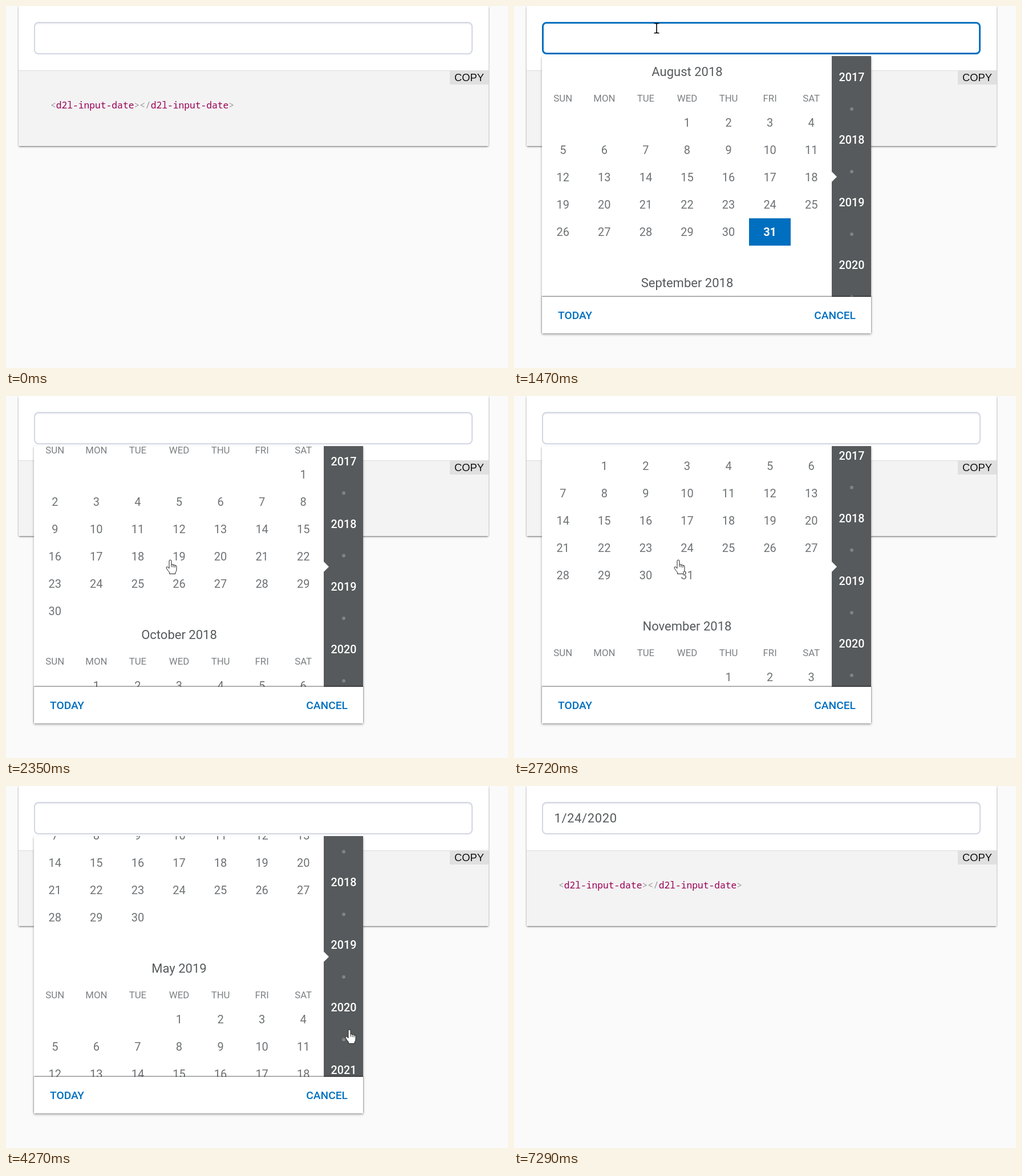
An HTML page for the animation above (8 s loop, 880 by 636 pixels).

```html
<!DOCTYPE html>
<html lang="en">
<head>
<meta charset="utf-8">
<title>Date input</title>
<style>
  html, body { margin: 0; width: 100%; height: 100%; overflow: hidden; background: #fafafa; }
  body { position: relative; font-family: Roboto, sans-serif; color: #565a5c; }
  div, svg { position: absolute; box-sizing: border-box; white-space: nowrap; }
  .card { left: 22px; top: 0; width: 824px; height: 246px; background: #fff;
    box-shadow: 0 2px 3px -1px rgba(0,0,0,.55), 0 0 3px rgba(0,0,0,.2); }
  .code { top: 113px; width: 824px; height: 133px; background: #f3f3f3; border-top: 1px solid #ddd;
    font: 16.28px/24px "Noto Sans Mono", monospace; color: #999; }
  .code b { font-weight: 400; color: #905; }
  .markup { left: 56px; top: 48px; }
  .copy { right: 0; top: 0; width: 68px; height: 24px; background: #e0e0e0; color: #111;
    font: 18.3px/24px "Liberation Sans", Arial, sans-serif; text-align: center; }
  .input { left: 49px; top: 28px; width: 769px; height: 57px; border-radius: 8px; background: #fff;
    border: 2px solid #d2d6e2; box-shadow: inset 0 2px 0 rgba(181,189,194,.2); }
  .input.active { border: 3px solid #006fbf; box-shadow: none; }
  .value { left: 70.5px; top: 42px; font-size: 22px; line-height: 30px; letter-spacing: .6px; }
  .caret { left: 71px; top: 43px; width: 2px; height: 27px; background: #555; }
  .popup { left: 49px; top: 88px; width: 577px; height: 487px; background: #fff;
    box-shadow: 0 2px 4px rgba(0,0,0,.36); }
  .months, .years { top: 0; height: 423px; overflow: hidden; }
  .months { left: 0; width: 508px; }
  .years { left: 508px; width: 69px; background: #565a5c; color: #fff; }
  .track { left: .5px; top: .5px; width: 100%; }
  .title { width: 508px; font-size: 22px; line-height: 48px; text-align: center; }
  .cell { width: 72.57px; height: 48px; line-height: 48px; font-size: 20px; text-align: center; color: #6e7275; }
  .weekday { font-size: 16.8px; color: #7c8083; }
  .today { background: #006fbf; color: #fff; font-weight: 700; }
  .year { width: 69px; font-size: 19.7px; font-weight: 500; line-height: 30px; text-align: center; }
  .dot { left: 31.5px; width: 6px; height: 6px; border-radius: 50%; background: #7f8385; }
  .marker { left: 508px; top: 203px; width: 9px; height: 18px; background: #fff;
    clip-path: polygon(0 0, 100% 50%, 0 100%); }
  .footer { left: 0; top: 423px; width: 577px; height: 64px; background: #fff;
    box-shadow: 0 -1px 2px rgba(0,0,0,.6); font-size: 19.2px; font-weight: 500; line-height: 65px; color: #006fbf; }
  .cursor { left: 0; top: 0; overflow: visible; fill: #fff; stroke: #222; stroke-width: 1; stroke-linejoin: round; }
  .cursor g { visibility: hidden; }
</style>
</head>
<body>
<div class="card">
  <div class="code">
    <div class="markup">&lt;<b>d2l-input-date</b>&gt;&lt;/<b>d2l-input-date</b>&gt;</div>
    <div class="copy">COPY</div>
  </div>
</div>
<div class="input" id="input"></div>
<div class="value" id="value">1/24/2020</div>
<div class="caret" id="caret"></div>
<div class="popup" id="popup">
  <div class="months"><div class="track" id="months"></div></div>
  <div class="years"><div class="track" id="years"></div></div>
  <div class="marker"></div>
  <div class="footer">
    <div style="left:28px">TODAY</div>
    <div style="right:27px">CANCEL</div>
  </div>
</div>
<svg class="cursor" width="1" height="1">
  <g id="arrow"><path d="M.5.5V19L4.5 15.2L7.3 21.2L9.8 20.1L7.1 14.2H13.2Z"/></g>
  <g id="hand">
    <path d="M-2 10V1Q-2-1 0-1T2 1V7Q4 6 5 7.7Q7 7 8 8.5Q11 8 11 11V16Q11 19 9 21V23.5H-1.5V21Q-5 17-6.6 13.8Q-7.6 11.3-5.8 11Q-4 10.8-2 14Z"/>
    <path fill="none" d="M2 7V11.5M5 7.7V12M8 8.5V12.5"/>
  </g>
  <g id="beam"><path fill="none" stroke="#000" stroke-width="1.6" d="M-4.5-8.5H-1.5L0-7.5L1.5-8.5H4.5M0-7.5V7.5M-4.5 8.5H-1.5L0 7.5L1.5 8.5H4.5"/></g>
</svg>
<script>
const LOOP = 8000, MONTH = 371, ROW = 48, COL = 508 / 7, YEAR = 110;
const $ = id => document.getElementById(id);

function add(parent, cls, top, left = 0, text = '') {
  const el = document.createElement('div');
  el.className = cls;
  el.style.top = top + 'px';
  if (left) el.style.left = left + 'px';
  el.textContent = text;
  parent.append(el);
}

const names = 'January February March April May June July August September October November December'.split(' ');
const weekdays = 'SUN MON TUE WED THU FRI SAT'.split(' ');

// August 2018 is month 0 of the scroller
for (let i = 0; i < 20; i++) {
  const first = new Date(2018, 7 + i, 1), y = first.getFullYear(), m = first.getMonth();
  const top = i * MONTH, start = first.getDay(), count = new Date(y, m + 1, 0).getDate();
  add($('months'), 'title', top + 3.5, 0, `${names[m]} ${y}`);
  weekdays.forEach((d, c) => add($('months'), 'cell weekday', top + 49, c * COL, d));
  for (let d = 1; d <= count; d++) {
    const n = start + d - 1;
    add($('months'), i === 0 && d === 31 ? 'cell today' : 'cell',
      top + 92 + Math.floor(n / 7) * ROW, n % 7 * COL, d);
  }
}
for (let y = 2016; y < 2025; y++) {
  const mid = 37.5 + (y - 2017) * YEAR;
  add($('years'), 'year', mid - 15, 0, y);
  add($('years'), 'dot', mid + 52, 0);
}

// The screen refreshes in even steps within each busy spell: start, end, count
const spells = [[120, 830, 10], [1150, 1940, 11], [2040, 2720, 10], [2950, 3720, 11],
  [4100, 4410, 5], [4880, 5100, 4], [5330, 5410, 2], [7120, 7290, 3]];
function refresh(t) {
  for (const [a, b, n] of spells) {
    const step = (b - a) / (n - 1);
    if (t >= a && t < b) return a + Math.floor((t - a) / step) * step;
  }
  return t;
}

// Keys: time, x, y, shape
const pointer = [
  [0, 300, 430, ''], [120, 300, 430, 'arrow'], [420, 268, 120, 'arrow'], [500, 260, 80, 'beam'],
  [830, 250, 39, 'beam'], [1520, 250, 39, 'beam'], [1650, 258, 87, 'hand'], [1940, 288, 289, 'hand'],
  [3020, 288, 289, 'hand'], [3400, 520, 390, 'hand'], [3480, 570, 410, 'arrow'], [3600, 634, 428, 'arrow'],
  [3720, 602, 429, 'arrow'], [3960, 602, 429, 'hand'], [4820, 602, 429, 'arrow'], [5100, 451, 402, 'arrow'],
  [5329, 451, 402, 'arrow'], [5330, 457, 404, 'hand'], [5410, 451, 402, 'hand'], [5970, 451, 402, 'arrow'],
  [7040, 451, 402, 'arrow'], [7205, 4, 223, 'arrow'], [7290, 4, 223, ''], [LOOP, 4, 223, '']
];
const wheel = [[0, 0], [1960, 0], [2040, 95], [2640, 775], [2720, 824], [2900, 824], [3120, 962], [LOOP, 962]];

function at(keys, t) {
  const i = Math.max(1, keys.findIndex(k => k[0] > t));
  const a = keys[i - 1], b = keys[i], p = (t - a[0]) / (b[0] - a[0]);
  return a.map((v, j) => typeof v === 'number' ? v + (b[j] - v) * p : v);
}
const clamp = v => Math.min(1, Math.max(0, v));
const ease = p => p < .5 ? 2 * p * p : 1 - 2 * (1 - p) ** 2;
// Wheel scrolling, then the jump after a click on the year bar
const scroll = t => at(wheel, t)[1] + 5308 * ease(clamp((t - 4127) / 283));

const show = (el, on) => el.style.visibility = on ? 'visible' : 'hidden';

function draw(now) {
  const t = refresh(now % LOOP);
  const [, x, y, shape] = at(pointer, t);
  for (const id of ['arrow', 'hand', 'beam']) {
    show($(id), id === shape);
    $(id).setAttribute('transform', `translate(${x} ${y})`);
  }
  $('input').classList.toggle('active', shape === 'beam');
  show($('caret'), t >= 1000 && t < 1150);
  show($('value'), t >= 5970);
  show($('popup'), t >= 1150 && t < 5970);
  $('popup').style.opacity = clamp((t - 1100) / 200);
  $('months').style.transform = `translateY(${-Math.round(scroll(t))}px)`;
  // The year bar trails the months by one screen refresh
  $('years').style.transform = `translateY(${-scroll(t - 15) * YEAR / (12 * MONTH)}px)`;
}

const begin = performance.now();
function tick() {
  draw(performance.now() - begin);
  requestAnimationFrame(tick);
}
tick();
</script>
</body>
</html>
```
